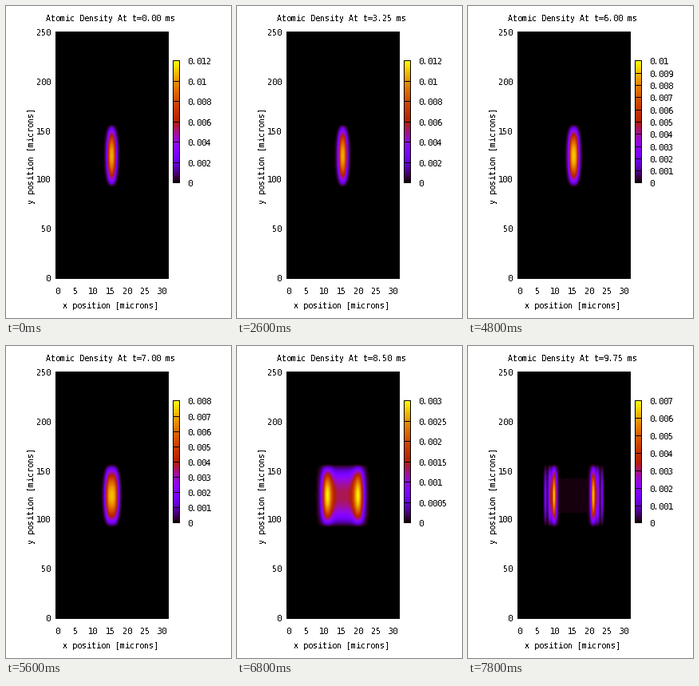
A matplotlib script for the animation above (8000 ms loop, 282 by 391 pixels).

```python
import math

import numpy as np
import matplotlib.pyplot as plt
from matplotlib.animation import FuncAnimation

W, H, DPI = 282, 391, 64
FRAMES, INTERVAL, DT = 40, 200, 0.25

LEFT, RIGHT, TOP, BOTTOM = 62, 203, 32, 341           # density map, inclusive
BAR_L, BAR_R, BAR_T, BAR_B = 209, 217, 68, 221        # colour bar, inclusive
CX, CY, RADIUS_Y = 132, 187, 38.5
ATOMS = 0.104
T_RAMP, T_SPLIT = 3, 8                                # in ms

x = np.abs(np.arange(LEFT, RIGHT + 1) - CX)[None, :]
q = 1 - ((np.arange(TOP, BOTTOM + 1)[:, None] - CY) / RADIUS_Y) ** 2
height = 0.5 * (q + np.sqrt(q * q + 0.002))           # parabola with a soft edge


def bell(center, sigma):
    return np.exp(-0.5 * ((x - center) / sigma) ** 2)


def widening(t):
    """One cloud that gets flatter and wider while its content stays the same."""
    s = np.clip((t - T_RAMP) / (T_SPLIT - T_RAMP), 0, 1) ** 3.24
    peak = 0.0105 - 0.0068 * s
    power = 2.4 + 1.6 * s
    width = ATOMS / (2 * peak * math.gamma(1 + 1 / power))
    return peak * height * np.exp(-(x / width) ** power / np.sqrt(height))


def splitting(t):
    """Two clouds that part, drain the middle and grow outer fringes."""
    r = t - T_SPLIT
    u = min(r, 1)
    v = max(r - 1, 0) / 0.75
    offset = 24.6 * (1 - (1 - u) ** 2.5)
    sigma = 3 + 4.5 * (1 - u) ** 1.5 - 0.75 * v
    middle = 0.0042 * math.exp(-2.27 * r)
    extent = offset + 2
    fringes = [(offset + 5.4 * j, v * 0.5 ** j) for j in (1, 2)]

    weight = sigma + sum(1.2 * amp for _, amp in fringes)
    peak = (ATOMS - 1.86 * extent * middle) / (2 * math.sqrt(2 * math.pi) * weight)
    n = bell(offset, sigma) + bell(-offset, sigma)
    n += sum(amp * bell(pos, 1.2) for pos, amp in fringes)
    return height * (peak * n + middle * np.exp(-(x / extent) ** 6))


def palette(v):
    v = np.minimum(np.floor(np.clip(v, 0, 1) * 128), 127) / 127
    rgb = np.stack([np.sqrt(v), v ** 3, np.clip(np.sin(2 * np.pi * v), 0, 1)], -1)
    return np.rint(rgb * 255).astype(np.uint8)


def scale(peak):
    """Tick step and number of steps that reach past the peak."""
    unit = 10.0 ** math.floor(math.log10(peak))
    norm = peak / unit
    step = unit * (1 if norm > 5 else 0.5 if norm > 2 else 0.2)
    return step, math.ceil(peak / step - 1e-9)


plt.rcParams["font.family"] = "DejaVu Sans Mono"
plt.rcParams["text.hinting"] = "force_autohint"
plt.rcParams["text.hinting_factor"] = 1

fig = plt.figure(figsize=(W / DPI, H / DPI), dpi=DPI, facecolor="white")
ax = fig.add_axes((0, 0, 1, 1))
ax.axis("off")

canvas = np.full((H, W, 3), 255, np.uint8)
ramp = palette(np.linspace(1, 0, BAR_B - BAR_T + 1))
picture = ax.imshow(canvas, extent=(0, W, H, 0), aspect="auto",
                    interpolation="nearest")
ax.set_xlim(0, W)
ax.set_ylim(H, 0)


def put(px, py, s, **kw):
    return ax.text(px, py, s, size=10 * 72 / DPI, color="black", ha="left",
                   va="baseline", antialiased=False, **kw)


title = put(50, 19, "")
put(71, 379, "x position [microns]")
put(35, 248, "y position [microns]", rotation=90, rotation_mode="anchor")
for v in range(0, 31, 5):
    put(round(65 + 4.37 * v - 3 * len(str(v))), 361, str(v))
for v in range(0, 251, 50):
    put(56 - 6 * len(str(v)), CY + 4 - int((v - 125) * 1.232), str(v))
labels = [put(228, 0, "") for _ in range(12)]


def draw(i):
    t = i * DT
    title.set_text(f"Atomic Density At t={t:.2f} ms")
    density = widening(t) if t <= T_SPLIT else splitting(t)
    step, count = scale(density.max())
    canvas[TOP:BOTTOM + 1, LEFT:RIGHT + 1] = palette(density / (step * count))

    bar = canvas[BAR_T:BAR_B + 1, BAR_L:BAR_R + 1]
    bar[:] = ramp[:, None]
    bar[:, [0, -1]] = 0
    for k, label in enumerate(labels):
        label.set_visible(k <= count)
        if k <= count:
            row = BAR_B - (BAR_B - BAR_T) * k // count
            bar[row - BAR_T] = 0
            label.set_text(f"{k * step:g}")
            label.set_y(row + 5)
    picture.set_data(canvas.copy())
    return [picture, title, *labels]


anim = FuncAnimation(fig, draw, frames=FRAMES, interval=INTERVAL,
                     init_func=lambda: draw(0), repeat=True, repeat_delay=0,
                     blit=False)
plt.show()
```
